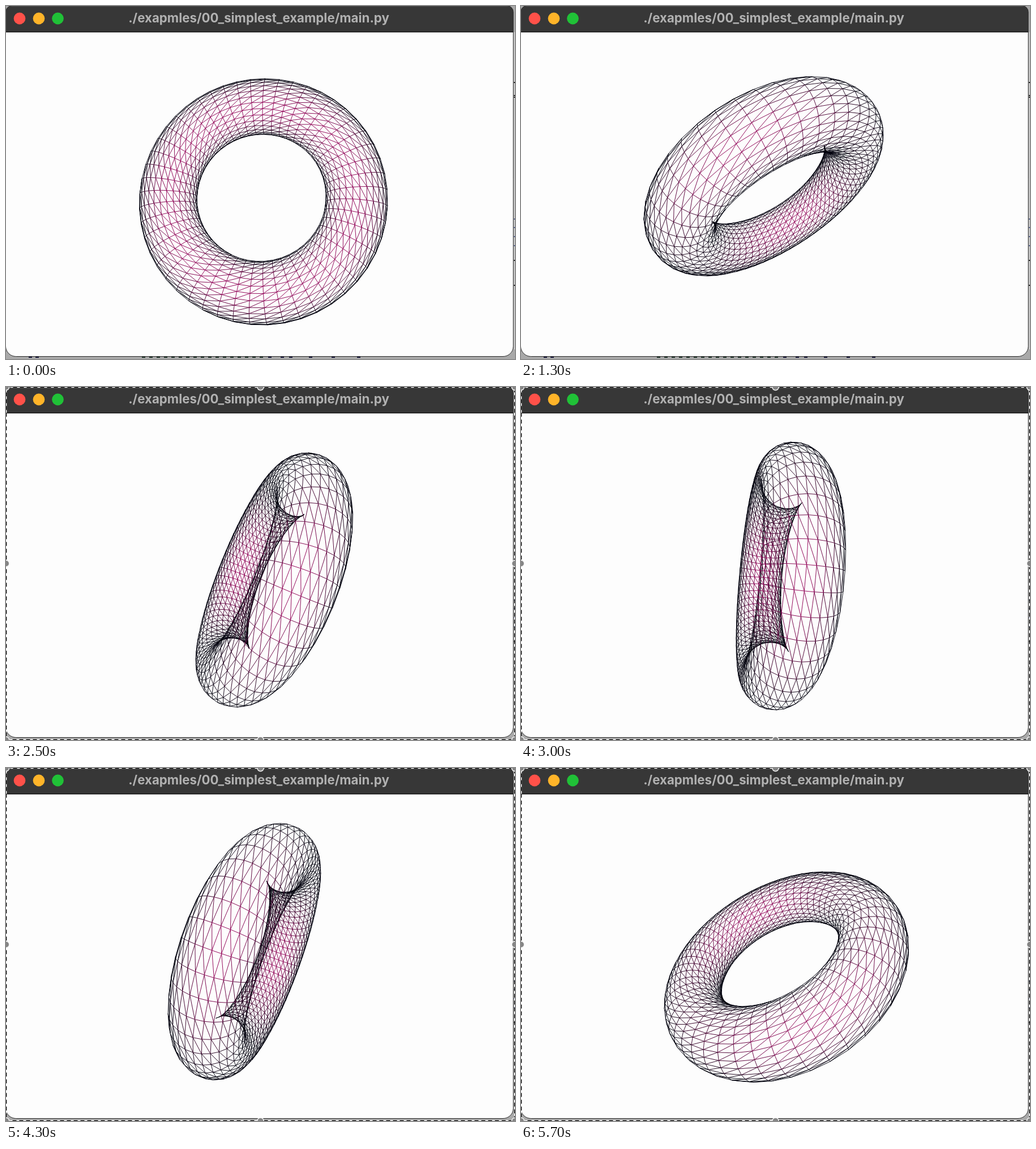
These frames come from a looping animation (899x623 px, 5.8 s). An HTML page with a canvas:

```html
<!DOCTYPE html>
<html lang="en">
<head>
<meta charset="utf-8">
<title>Torus wireframe</title>
<style>
html, body { margin: 0; width: 100%; height: 100%; overflow: hidden; background: #a9a9a9; }
canvas { display: block; width: 899px; height: 623px; }
</style>
</head>
<body>
<canvas id="stage" width="899" height="623"></canvas>
<script>
const W = 899, H = 623, LOOP = 5800, STEP = 100;
const SELECT_AT = 1900;
const ctx = document.getElementById('stage').getContext('2d');

// Camera: 60 degree vertical field of view, three units from the torus.
const CX = 448, CY = 332, DIST = 3, FOCAL = 286 / Math.tan(Math.PI / 6);
const RINGS = 50, SIDES = 30, TUBE = 0.3;
const SHADES = 12;

// Turn about x in radians at given seconds; the turn about y is half of it.
const TURN = [[0, -0.183], [0.4, 0.133], [1.3, 1.022], [2, 1.708],
              [3, 2.71], [4.3, 4.025], [5.7, 5.447]];

function turnAt(s) {
  let k = 0;
  while (k < TURN.length - 2 && s > TURN[k + 1][0]) k++;
  const [t0, a0] = TURN[k], [t1, a1] = TURN[k + 1];
  return a0 + (a1 - a0) * (s - t0) / (t1 - t0);
}

function rotator(a, b) {
  const ca = Math.cos(a), sa = Math.sin(a), cb = Math.cos(b), sb = Math.sin(b);
  return (x, y, z) => {
    const x1 = x * cb + z * sb, z1 = z * cb - x * sb;
    return [x1, y * ca - z1 * sa, y * sa + z1 * ca];
  };
}

function buildPoints(rotate) {
  const pts = [];
  for (let i = 0; i < RINGS; i++) {
    const u = i / RINGS * 2 * Math.PI, cu = Math.cos(u), su = Math.sin(u);
    for (let j = 0; j < SIDES; j++) {
      const v = j / SIDES * 2 * Math.PI, cv = Math.cos(v), sv = Math.sin(v);
      const rad = 1 + TUBE * cv;
      const [x, y, z] = rotate(rad * cu, rad * su, TUBE * sv);
      const [nx, ny, nz] = rotate(cv * cu, cv * su, sv);
      const depth = DIST - z, scale = FOCAL / depth;
      pts.push({
        x: CX + x * scale,
        y: CY - y * scale,
        facing: (nz * depth - nx * x - ny * y) / Math.hypot(x, y, depth)
      });
    }
  }
  return pts;
}

// Counter-clockwise on screen (y down) means the triangle faces the camera.
const isFront = (p, q, r) =>
  (q.x - p.x) * (r.y - p.y) - (q.y - p.y) * (r.x - p.x) < 0;

function drawTorus(turn) {
  const pts = buildPoints(rotator(turn, turn / 2));
  const at = (i, j) => pts[(i + RINGS) % RINGS * SIDES + (j + SIDES) % SIDES];
  const paths = Array.from({ length: SHADES }, () => new Path2D());
  // Every cell is split along its (i, j) to (i+1, j+1) diagonal.
  const lower = (i, j) => isFront(at(i, j), at(i + 1, j), at(i + 1, j + 1));
  const upper = (i, j) => isFront(at(i, j), at(i + 1, j + 1), at(i, j + 1));
  const edge = (p, q) => {
    const f = Math.max(0, (p.facing + q.facing) / 2);
    const path = paths[Math.min(SHADES - 1, Math.floor(f * f * SHADES))];
    path.moveTo(p.x, p.y);
    path.lineTo(q.x, q.y);
  };
  for (let i = 0; i < RINGS; i++) {
    for (let j = 0; j < SIDES; j++) {
      const p = at(i, j), low = lower(i, j), up = upper(i, j);
      if (low || up) edge(p, at(i + 1, j + 1));
      if (low || upper(i, j - 1)) edge(p, at(i + 1, j));
      if (up || lower(i - 1, j)) edge(p, at(i, j + 1));
    }
  }
  ctx.lineWidth = 0.95;
  ctx.lineCap = 'butt';
  paths.forEach((path, k) => {
    const s = k / (SHADES - 1);
    ctx.strokeStyle = `rgb(${Math.round(145 * s)},0,${Math.round(12 + 74 * s)})`;
    ctx.stroke(path);
  });
}

function dot(x, y, r, fill) {
  ctx.fillStyle = fill;
  ctx.beginPath();
  ctx.arc(x, y, r, 0, 2 * Math.PI);
  ctx.fill();
}

function drawDesktop(selected) {
  ctx.fillStyle = '#a9a9a9';
  ctx.fillRect(0, 0, W, H);
  ctx.fillStyle = '#c9c9c9';
  ctx.fillRect(897, 46, 2, 560);
  ctx.fillStyle = '#222';
  for (const y of [134, 157, 160, 448, 492]) ctx.fillRect(897, y, 2, 2);
  ctx.fillStyle = '#55608a';
  for (const y of [375, 390, 406, 422]) ctx.fillRect(897, y, 2, 2);
  if (selected) return;
  // Tops of a code line showing below the window.
  ctx.fillStyle = '#26382f';
  for (let x = 240; x < 460; x += 13) ctx.fillRect(x, 619, 6, 2);
  ctx.fillStyle = '#1c1c3c';
  for (const x of [40, 52, 463, 485, 500, 535, 575, 620]) ctx.fillRect(x, 619, 6, 2);
}

const TITLE = './exapmles/00_simplest_example/main.py';
const titleFont = px => `bold ${px}px Inter, "Open Sans", sans-serif`;
ctx.font = titleFont(100);
const titleSize = 461 / ctx.measureText(TITLE).width * 100;

function drawWindow() {
  ctx.save();
  ctx.beginPath();
  ctx.roundRect(-0.5, -0.5, 896.5, 619, [11, 11, 18, 18]);
  ctx.fillStyle = '#fdfdfd';
  ctx.fill();
  ctx.save();
  ctx.clip();
  ctx.fillStyle = '#373737';
  ctx.fillRect(0, 0, 897, 46);
  ctx.fillStyle = '#4b4b4b';
  ctx.fillRect(0, 0, 897, 1);
  ctx.fillStyle = '#0c0c0c';
  ctx.fillRect(0, 45, 897, 1.5);
  ctx.restore();
  ctx.strokeStyle = '#2a2a2a';
  ctx.lineWidth = 1;
  ctx.stroke();
  ctx.restore();

  dot(24, 22, 10.4, '#ff5149');
  dot(58, 22, 10.4, '#ffb429');
  dot(91.5, 22, 10.4, '#20c137');

  ctx.font = titleFont(titleSize);
  ctx.textAlign = 'center';
  ctx.textBaseline = 'alphabetic';
  ctx.fillStyle = '#b1b1b1';
  ctx.fillText(TITLE, 446.5, 29);
}

function drawSelection() {
  const frame = (color, dash) => {
    ctx.strokeStyle = color;
    ctx.setLineDash(dash);
    ctx.strokeRect(0.5, 0.5, W - 1, H - 1);
  };
  ctx.lineWidth = 1.6;
  frame('#fff', []);
  frame('#000', [7, 5]);
  ctx.setLineDash([]);
  for (const x of [0, 449.5, W]) {
    for (const y of [0, 311.5, H]) {
      if (x === 449.5 && y === 311.5) continue;
      dot(x, y, 6.5, '#f4f4f4');
      dot(x, y, 5, '#858585');
    }
  }
}

function draw(ms) {
  const selected = ms >= SELECT_AT;
  drawDesktop(selected);
  drawWindow();
  drawTorus(turnAt(ms / 1000));
  if (selected) drawSelection();
}

let start = null, shown = -1;
function tick(now) {
  if (start === null) start = now;
  const ms = Math.floor((now - start) % LOOP / STEP) * STEP;
  if (ms !== shown) draw(shown = ms);
  requestAnimationFrame(tick);
}
draw(0);
requestAnimationFrame(tick);
</script>
</body>
</html>
```
